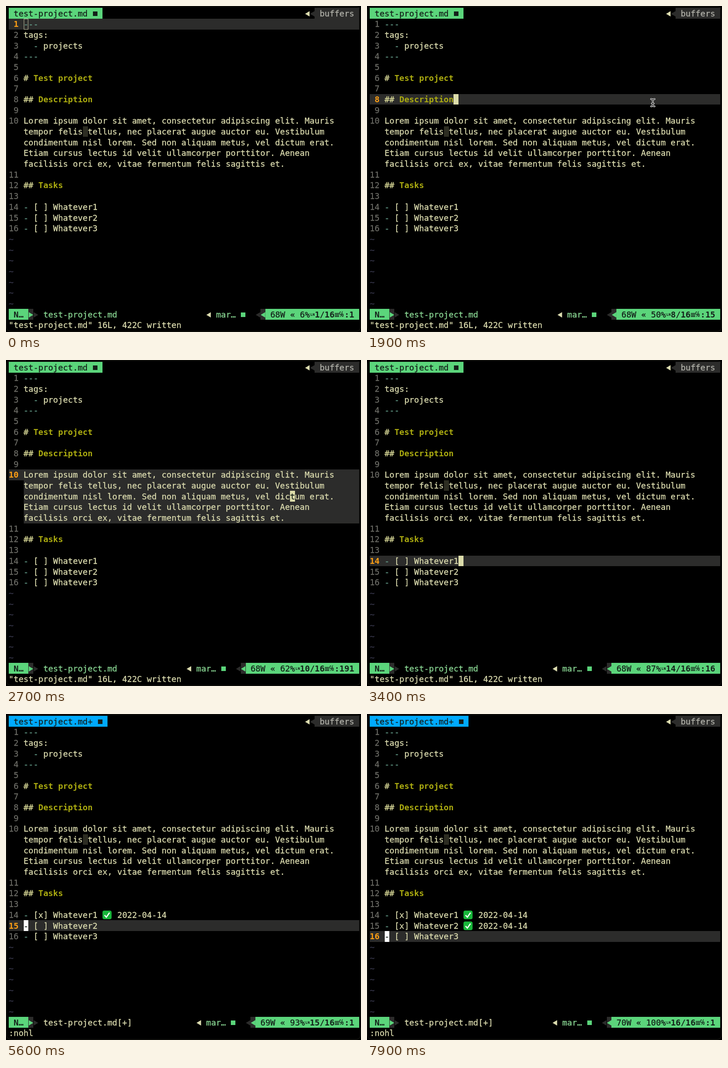
These frames come from a looping animation (780 px wide and 718 px high, 8000 ms). An HTML page:

```html
<!DOCTYPE html>
<html lang="en">
<head>
<meta charset="utf-8">
<title>Editor</title>
<style>
html, body { margin: 0; width: 100%; height: 100%; overflow: hidden; background: #000; }
#stage {
  position: relative; width: 780px; height: 718px; overflow: hidden; background: #000; color: #dcdcaf;
  font: 18.013px/23.68px "DejaVu Sans Mono", "Noto Sans Mono", monospace;
  font-variant-ligatures: none; -webkit-text-stroke: .3px;
}
#frame { position: absolute; inset: 1px; border: 1px solid #1c1c17; border-radius: 9px; }
#screen { position: absolute; inset: 0; }
#screen > * { position: absolute; white-space: pre; }
#pointer { position: absolute; left: 0; top: 0; }
.num { color: #6c6c66; }
.now { color: #ff9f14; }
.mark { color: #669f8c; }
.hash { color: #d7d796; }
.head { color: #abab10; }
.tilde { color: #38384c; }
.ink { color: #14201a; }
.now, .head, .bold { font-weight: 700; -webkit-text-stroke: 0; }
.green { color: #8ad894; }
.soft { color: #b2b2aa; }
.tiny { font-size: 8px; }
.small { font-size: 15px; }
</style>
</head>
<body>
<div id="stage">
  <div id="frame"></div>
  <div id="screen"></div>
  <svg id="pointer" width="16" height="22" viewBox="-8 -11 16 22" fill="none" stroke-linecap="round">
    <path stroke="#fff" stroke-width="3.4" d="M-4 -8Q0 -8 0 -5Q0 -8 4 -8M0 -5V5M-4 8Q0 8 0 5Q0 8 4 8M-2 2H2"/>
    <path stroke="#111" stroke-width="1.3" d="M-4 -8Q0 -8 0 -5Q0 -8 4 -8M0 -5V5M-4 8Q0 8 0 5Q0 8 4 8M-2 2H2"/>
  </svg>
</div>
<script>
const LOOP = 8000, LEFT = 6, TOP = 4.3, CW = 10.845, RH = 23.68, COLS = 71, GUTTER = 3;
const FG = '#dcdcaf', GREEN = '#5bd57b', BLUE = '#00aaff', DIM = '#2c2c2b', INK = '#14201a';
const screen = document.getElementById('screen');
const pointer = document.getElementById('pointer');

const prose = [
  'Lorem ipsum dolor sit amet, consectetur adipiscing elit. Mauris',
  'tempor felis tellus, nec placerat augue auctor eu. Vestibulum',
  'condimentum nisl lorem. Sed non aliquam metus, vel dictum erat.',
  'Etiam cursus lectus id velit ullamcorper porttitor. Aenean',
  'facilisis orci ex, vitae fermentum felis sagittis et.'
];

// time, line, wrapped row, wanted column, tasks done
const steps = [
  [0, 1, 0, 0, 0],
  [1500, 8, 0, 54, 0],
  [2500, 9, 0, 54, 0],
  [2600, 10, 0, 54, 0],
  [2700, 10, 2, 54, 0],
  [2800, 11, 0, 54, 0],
  [2900, 14, 0, 54, 0],
  [4800, 14, 0, 0, 1],
  [5300, 15, 0, 0, 1],
  [7100, 15, 0, 0, 2],
  [7600, 16, 0, 0, 2]
];

const x = col => LEFT + col * CW;
const y = row => TOP + row * RH;
const rowOf = line => line <= 10 ? line : line + 4;

function add(css, left, top) {
  const el = document.createElement('div');
  el.style.cssText = css;
  el.style.left = left + 'px';
  el.style.top = top + 'px';
  screen.append(el);
  return el;
}

function bar(col, row, cols, color, rows = 1) {
  const top = Math.round(y(row)), h = Math.round(y(row + rows)) - top;
  const left = Math.round(x(col)), w = Math.round(x(col + cols)) - left;
  return add(`width:${w}px;height:${h}px;background:${color}`, left, top);
}

function text(col, row, str, cls = '') {
  const el = add('', x(col), y(row) + .3);
  el.className = cls;
  el.textContent = str;
}

function arrow(col, row, color, dir = 'left', h = 12) {
  const shape = dir === 'left' ? '100% 0,100% 100%,0 50%' : '0 0,100% 50%,0 100%';
  add(`width:10px;height:${h}px;background:${color};clip-path:polygon(${shape})`,
    x(col) + .5, y(row) + (RH - h) / 2 + 1);
}

function fileIcon(mid, row, color) {
  add(`width:10px;height:10px;background:${color}`, x(mid) - 5, y(row) + 7.5);
}

function tick(col, row) {
  add('width:20px;height:19px;border-radius:4px;background:#18b53a', x(col) + .3, y(row) + 2.5).innerHTML =
    '<svg width="20" height="19" style="display:block"><path d="M4.5 10l4 4.5L15.5 4.5" fill="none" stroke="#fff" stroke-width="2.6"/></svg>';
}

function documentLines(done) {
  const head = (hash, title) => [['hash', hash + ' '], ['head', title]];
  const task = n => [['mark', '- '], ['', `[${n <= done ? 'x' : ' '}] Whatever${n}`]];
  return [
    [['mark', '---']], [['', 'tags:']], [['mark', '  - '], ['', 'projects']], [['mark', '---']], [],
    head('#', 'Test project'), [], head('##', 'Description'), [], [['', prose[0]]], [],
    head('##', 'Tasks'), [], task(1), task(2), task(3)
  ];
}

function tabline(changed) {
  const name = 'test-project.md' + (changed ? '+' : '');
  bar(0, 0, name.length + 4, changed ? BLUE : GREEN);
  text(1, 0, name, 'ink');
  fileIcon(name.length + 2.5, 0, INK);
  arrow(60, 0, FG);
  arrow(61, 0, DIM);
  bar(62, 0, 9, DIM);
  text(63, 0, 'buffers', 'soft');
}

function statusline(line, vcol, done) {
  const row = 28;
  bar(0, row, 4, GREEN);
  text(1, row, 'N…', 'ink bold');
  bar(4, row, 1, DIM);
  arrow(4, row, GREEN, 'right');
  arrow(5, row, DIM, 'right');
  text(7, row, 'test-project.md' + (done ? '[+]' : ''), done ? '' : 'green');

  const info = `${68 + done}W « ${Math.floor(line / 16 * 100)}%`;
  const place = `${line}/16`, tail = `:${vcol}`;
  const start = COLS - (info.length + place.length + tail.length + 5);
  arrow(start - 12, row, FG);
  text(start - 10, row, 'mar…', 'green');
  fileIcon(start - 4.5, row, GREEN);
  arrow(start - 2, row, DIM);
  bar(start - 1, row, 1, DIM);
  arrow(start - 1, row, GREEN);
  bar(start, row, COLS - start, GREEN);
  let col = start + 1;
  text(col, row, info, 'ink');
  col += info.length;
  text(col + .1, row, 'ʟɴ', 'ink tiny');
  text(++col, row, place, 'ink bold');
  col += place.length;
  text(col, row, '≡', 'ink');
  text(col + 1, row, '℅', 'ink small');
  text(col + 2, row, tail, 'ink bold');
}

function draw([time, line, sub, want, done]) {
  screen.textContent = '';
  const lines = documentLines(done);
  const here = line === 10 ? prose[sub] : lines[line - 1].map(p => p[1]).join('');
  const idx = Math.min(want, here.length);
  const row = rowOf(line) + sub;

  tabline(done > 0);
  bar(0, rowOf(line), COLS, DIM);
  if (line === 10) bar(GUTTER, 11, COLS - GUTTER, DIM, 4);
  else bar(GUTTER + 12, 11, 1, '#2d2d22');

  lines.forEach((parts, i) => {
    const r = rowOf(i + 1);
    text(0, r, String(i + 1).padStart(2), i + 1 === line ? 'now' : 'num');
    let col = GUTTER;
    for (const [cls, str] of parts) {
      text(col, r, str, cls);
      col += str.length;
    }
    if (i >= 13 && i - 12 <= done) {
      tick(GUTTER + 16, r);
      text(GUTTER + 19, r, '2022-04-14');
    }
  });
  prose.slice(1).forEach((str, i) => text(GUTTER, 11 + i, str));
  for (let r = 21; r < 28; r++) text(0, r, '~', 'tilde');

  if (time === 0) {
    const box = bar(GUTTER, row, 1, 'transparent');
    box.style.boxShadow = 'inset 0 0 0 1px #b9b99a';
  } else {
    bar(GUTTER + idx, row, 1, done ? '#fff' : '#dcdcaa');
    text(GUTTER + idx, row, here[idx] || ' ', 'ink');
  }

  statusline(line, 68 * sub + idx + 1, done);
  text(0, 29, done ? ':nohl' : '"test-project.md" 16L, 422C written');
}

function movePointer(t) {
  const p = Math.min(1, Math.max(0, (t - 700) / 700));
  const rest = (1 - p) ** 2;
  pointer.style.visibility = t >= 700 && t < 2500 ? 'visible' : 'hidden';
  pointer.style.transform = `translate(${620 + 162 * rest}px,${202 + 50 * rest}px)`;
}

let shown;
function play() {
  const t = Math.floor(performance.now() % LOOP / 100) * 100;
  const step = steps.findLast(s => s[0] <= t);
  if (step !== shown) draw(shown = step);
  movePointer(t);
  requestAnimationFrame(play);
}
play();
</script>
</body>
</html>
```
